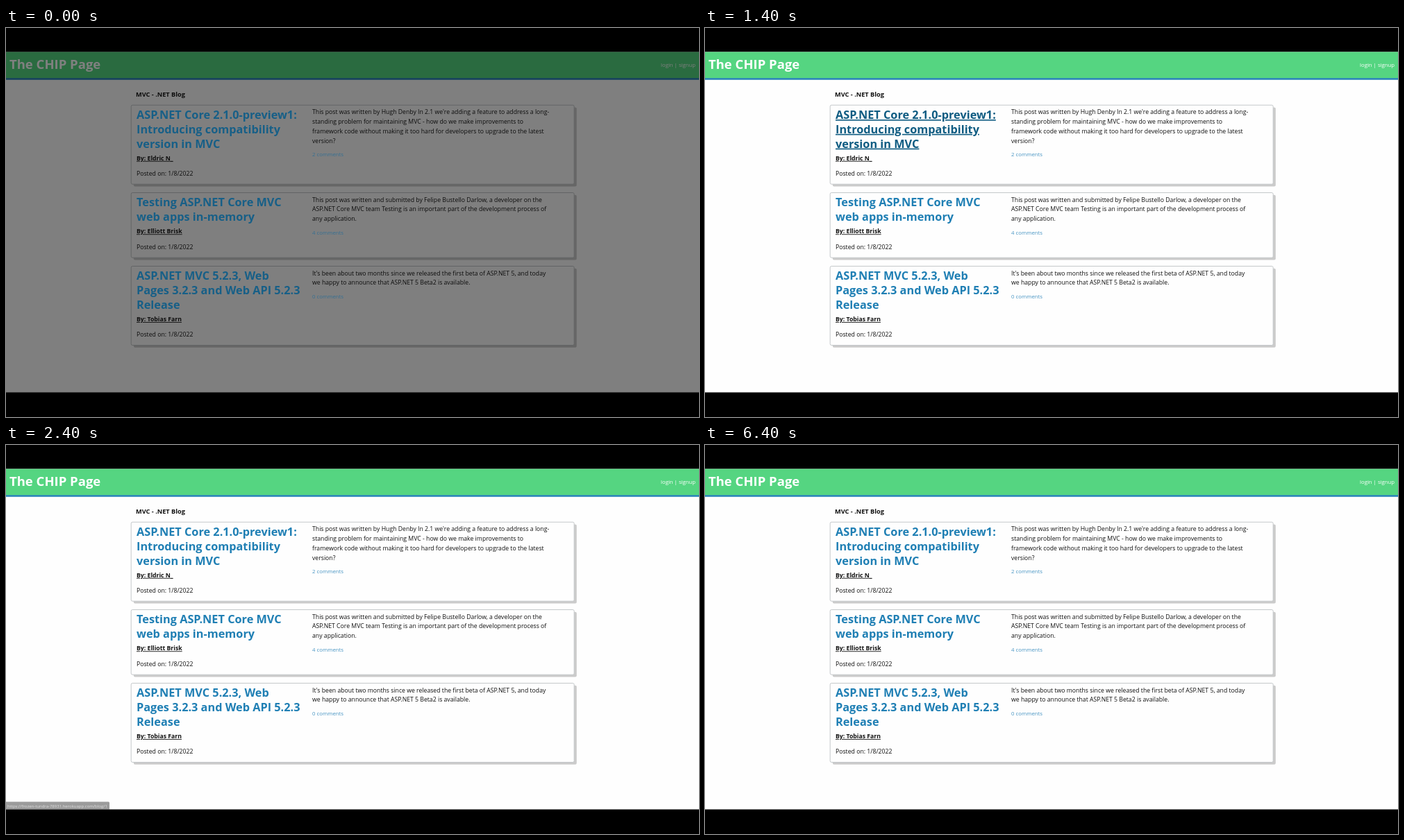
An HTML page that plays this animation: 998 by 561 pixels, repeating every 8 s.

```html
<!DOCTYPE html>
<html lang="en">
<head>
<meta charset="utf-8">
<title>Blog page</title>
<style>
  html, body { margin: 0; width: 100%; height: 100%; overflow: hidden; background: #000; }
  svg { display: block; width: 998px; height: 561px; }
  text { font: 8.7px "Open Sans", "Noto Sans", sans-serif; fill: #111; }
  .brand { font-size: 18.5px; font-weight: 700; fill: #fff; }
  .nav { font-size: 7.75px; fill: #fff; }
  .section { font-size: 9.2px; font-weight: 700; }
  .title { font-size: 16.3px; font-weight: 700; fill: #1f7fb4; }
  .title.hover { fill: #0f5c82; text-decoration: underline; }
  .author { font-weight: 700; text-decoration: underline; }
  .comments { font-size: 7.8px; fill: #4593c2; }
  .url { font-size: 6px; fill: #b4b4b4; }
</style>
</head>
<body>
<svg viewBox="0 0 998 561">
  <g id="paper">
    <rect y="34.5" width="998" height="491" fill="#fefefe"/>
    <rect y="34.5" width="998" height="38" fill="#55d581"/>
    <rect y="72.2" width="998" height="2.5" fill="#2180b5"/>
    <text class="brand" x="5" y="59">The CHIP Page</text>
    <text class="nav" x="943" y="56">login | signup</text>
  </g>
  <g id="ink">
    <text class="section" x="187" y="99">MVC - .NET Blog</text>
  </g>
  <g id="status">
    <path d="M0 514.5H147.5q1.5 0 1.5 1.5V525.5H0z" fill="#080808"/>
    <text class="url" x="2" y="522.5">https://frozen-tundra-78931.herokuapp.com/blog/1</text>
  </g>
</svg>
<script>
const $ = id => document.getElementById(id);
const LOOP = 8000;

const posts = [
  { y: 111, h: 114, author: 'Eldric N_', comments: 2,
    title: ['ASP.NET Core 2.1.0-preview1:', 'Introducing compatibility', 'version in MVC'],
    body: ["This post was written by Hugh Denby In 2.1 we're adding a feature to address a long-",
      'standing problem for maintaining MVC - how do we make improvements to',
      'framework code without making it too hard for developers to upgrade to the latest',
      'version?'] },
  { y: 237.3, h: 93.7, author: 'Elliott Brisk', comments: 4,
    title: ['Testing ASP.NET Core MVC', 'web apps in-memory'],
    body: ['This post was written and submitted by Felipe Bustello Darlow, a developer on the',
      'ASP.NET Core MVC team Testing is an important part of the development process of',
      'any application.'] },
  { y: 343.3, h: 114, author: 'Tobias Farn', comments: 0,
    title: ['ASP.NET MVC 5.2.3, Web', 'Pages 3.2.3 and Web API 5.2.3', 'Release'],
    body: ["It's been about two months since we released the first beta of ASP.NET 5, and today",
      'we happy to announce that ASP.NET 5 Beta2 is available.'] }
];

const line = (cls, x, y, str) => `<text class="${cls}" x="${x}" y="${y}">${str}</text>`;

function addPost({ y, h, author, comments, title, body }) {
  const box = (x, y, style) => `<rect x="${x}" y="${y}" width="638" height="${h}" rx="2" ${style}/>`;
  $('paper').insertAdjacentHTML('beforeend',
    box(183.8, y + 3.5, 'fill="#cbcbcb"') + box(180.2, y + .2, 'fill="#fefefe" stroke="#c4c8ca"'));

  const titleEnd = y + 20 + (title.length - 1) * 20.8;
  const bodyEnd = y + 13.2 + (body.length - 1) * 13.8;
  $('ink').insertAdjacentHTML('beforeend',
    title.map((s, i) => line('title', 188, y + 20 + i * 20.8, s)).join('') +
    line('author', 188, titleEnd + 18.2, 'By: ' + author) +
    line('date', 188, titleEnd + 40.4, 'Posted on: 1/8/2022') +
    body.map((s, i) => line('body', 441, y + 13.2 + i * 13.8, s)).join('') +
    line('comments', 441, bodyEnd + 19.6, comments + ' comments'));
}
posts.forEach(addPost);

const hoverLines = [...document.querySelectorAll('.title')].slice(0, posts[0].title.length);

// Opacity of the link status bubble, stepping every 200 ms.
function statusOpacity(t) {
  if (t < 1600 || t >= 2600) return 0;
  if (t < 1800) return .7;
  if (t < 2200) return 1;
  return t < 2400 ? .9 : .4;
}

function draw(now) {
  const t = now % LOOP;
  const dim = t < 200;
  $('paper').style.filter = dim ? 'brightness(.5)' : 'none';
  $('ink').style.filter = dim ? 'brightness(.75)' : 'none';
  hoverLines.forEach(el => el.classList.toggle('hover', t >= 1400 && t < 2000));
  $('status').style.opacity = statusOpacity(t);
}

const start = performance.now();
function tick() {
  draw(performance.now() - start);
  requestAnimationFrame(tick);
}
tick();
</script>
</body>
</html>
```
